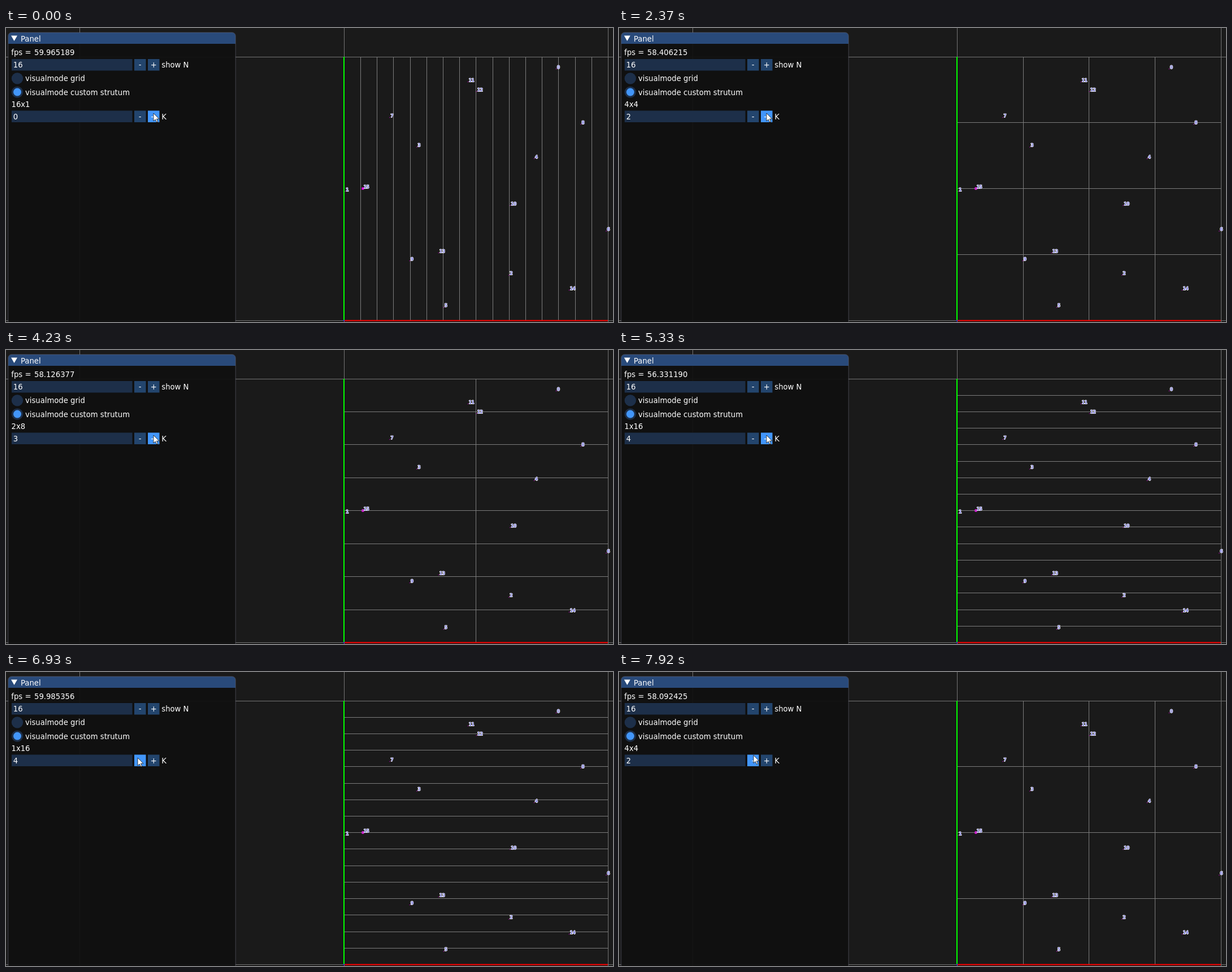
Animation of 1074x521 px, one loop 8 s. Source, as an HTML page with a canvas:

```html
<!DOCTYPE html>
<html lang="en">
<head>
<meta charset="utf-8">
<title>Panel</title>
<style>
  html, body { margin: 0; width: 100%; height: 100%; overflow: hidden; background: #1a1a1a; }
  canvas { display: block; }
</style>
</head>
<body>
<canvas id="stage" width="1074" height="521"></canvas>
<script>
const ctx = document.getElementById('stage').getContext('2d');
const W = 1074, H = 521, LOOP = 8000;
const FONT = '"DejaVu Sans", Verdana, sans-serif';
const COL = {
  bg: '#1a1a1a', grid: '#747474', cell: '#7c7c7c', title: '#294a7a',
  frame: '#1d2f49', button: '#23456d', hover: '#4296fa', active: '#0f87fa'
};

// Each track is a list of [start ms, value]; values hold until the next start.
const FPS = [
  [0, '59.965189'], [600, '57.812649'], [1060, '58.340433'], [1620, '59.127843'],
  [2080, '58.406215'], [2650, '58.471938'], [3260, '57.863630'], [3800, '58.704152'],
  [4230, '58.126377'], [4780, '56.331864'], [5330, '56.331190'], [5910, '58.215847'],
  [6340, '57.540913'], [6930, '59.985356'], [7340, '57.318864'], [7920, '58.092425']
];
const LEVEL = [[0, 0], [1210, 1], [2370, 2], [3650, 3], [4650, 4], [7340, 3], [7790, 2]];
const MOUSE = [[0, [261, 151]], [6340, [256, 152]], [6490, [233, 152]], [7340, [238, 147.5]]];
const PRESS = [[0, false], [1060, true], [1210, false], [3530, true], [3650, false],
  [4530, true], [4650, false], [7650, true], [7790, false]];

const POINTS = [
  [973.5, 72.5], [600, 289.5], [890, 438], [727, 211], [934.5, 231.5], [774.5, 495],
  [1062, 360], [679, 158.5], [1017, 170.5], [714.5, 412.5], [892, 314.5], [817.5, 95.5],
  [832.5, 112.5], [765.5, 398.5], [996.5, 464.5], [631.5, 284.5]
];

function at(track, t) {
  let value = track[0][1];
  for (const [start, v] of track) if (t >= start) value = v;
  return value;
}

function rect(x, y, w, h, color) {
  ctx.fillStyle = color;
  ctx.fillRect(x, y, w, h);
}

function disc(x, y, r, color) {
  ctx.fillStyle = color;
  ctx.beginPath();
  ctx.arc(x, y, r, 0, Math.PI * 2);
  ctx.fill();
}

function polygon(points, color) {
  ctx.beginPath();
  for (const [x, y] of points) ctx.lineTo(x, y);
  ctx.closePath();
  ctx.fillStyle = color;
  ctx.fill();
}

function text(s, x, y, align = 'left') {
  ctx.font = '13.2px ' + FONT;
  ctx.textAlign = align;
  ctx.fillStyle = '#fff';
  ctx.fillText(s, x, y);
}

const gridX = i => Math.round(597.8 + 29.2 * i);
const gridY = i => Math.round(50.5 + 29.22 * i);

function drawPlot(level) {
  rect(0, 0, W, H, COL.bg);
  for (const x of [130, 598, 1065]) rect(x, 0, 1, H, COL.grid);
  for (const y of [51, 518]) rect(0, y, W, 1, COL.grid);

  if (level) disc(631.5, 284.5, 2.5, '#cc1fcc');
  for (let i = 1 << level; i < 16; i += 1 << level) rect(gridX(i), 51, 1, 467, COL.cell);
  for (let i = 16 >> level; i < 16; i += 16 >> level) {
    rect(598, gridY(i), 467, 1, COL.cell);
  }
  rect(598, 517.5, 467, 2, '#f00');
  rect(597, 51, 2, 467, '#0f0');
  rect(597, 517.5, 2, 2, '#22f');

  if (level) disc(631.5, 284.5, 2.2, 'rgba(204,31,204,.8)');
  else rect(629.5, 282.5, 4, 4, '#f0f');
  POINTS.forEach(([x, y], i) => {
    if (i < 15) rect(x - .7, y - .7, 1.4, 1.4, '#a812a8');
    drawLabel(i, x + 1.4, y - 1);
  });
}

function drawLabel(s, x, y) {
  ctx.font = '7.6px ' + FONT;
  ctx.textAlign = 'left';
  ctx.lineJoin = 'round';
  ctx.lineWidth = 1.9;
  ctx.strokeStyle = '#fff';
  ctx.strokeText(s, x, y);
  ctx.fillStyle = '#2424c8';
  ctx.fillText(s, x, y);
}

function drawSpinner(y, value, label, minus, plus) {
  rect(10, y, 213.5, 20.5, COL.frame);
  rect(227, y, 20.5, 20.5, minus);
  rect(251, y, 20.5, 20.5, plus);
  const base = y + 15.2;
  text(value, 12.8, base);
  text('-', 237.2, base, 'center');
  text('+', 261.2, base, 'center');
  text(label, 275.3, base);
}

function drawRadio(y, label, on) {
  disc(20, y, 10.2, COL.frame);
  if (on) disc(20, y, 7, COL.hover);
  text(label, 34, y + 4.9);
}

function drawPanel(t, level, mouse) {
  ctx.beginPath();
  ctx.roundRect(4, 8, 402, 540, 6);
  ctx.fillStyle = 'rgba(15,15,15,.94)';
  ctx.fill();
  ctx.beginPath();
  ctx.roundRect(4, 8, 402, 20, [6, 6, 0, 0]);
  ctx.fillStyle = COL.title;
  ctx.fill();
  ctx.beginPath();
  ctx.roundRect(3.8, 8, 402.4, 540, 6);
  ctx.strokeStyle = 'rgba(110,110,128,.5)';
  ctx.lineWidth = 1;
  ctx.stroke();

  polygon([[9, 13.5], [20, 13.5], [14.5, 23]], '#fff');
  text('Panel', 26, 23.5);
  text('fps =', 9.3, 48.3);
  text(at(FPS, t), 50, 48.3);
  drawSpinner(55, '16', 'show N', COL.button, COL.button);
  drawRadio(89.4, 'visualmode grid', false);
  drawRadio(113.6, 'visualmode custom strutum', true);
  text((16 >> level) + 'x' + (1 << level), 9.5, 140.3);

  const lit = at(PRESS, t) ? COL.active : COL.hover;
  const overPlus = mouse[0] > 250;
  drawSpinner(146.5, String(level), 'K',
    overPlus ? COL.button : lit, overPlus ? lit : COL.button);
}

const ARROW = [[0, 0], [0, 16], [3.8, 12.7], [6.4, 18.4], [8.8, 17.3], [6.3, 11.7], [11.4, 11.7]];

function drawMouse([x, y]) {
  polygon(ARROW.map(([u, v]) => [x + u * .87, y + v * .87]), '#fff');
  ctx.strokeStyle = '#111';
  ctx.lineWidth = .8;
  ctx.stroke();
}

function frame(now) {
  const t = now % LOOP;
  const level = at(LEVEL, t), mouse = at(MOUSE, t);
  drawPlot(level);
  drawPanel(t, level, mouse);
  drawMouse(mouse);
  requestAnimationFrame(() => frame(performance.now() - begin));
}

const begin = performance.now();
frame(0);
</script>
</body>
</html>
```
